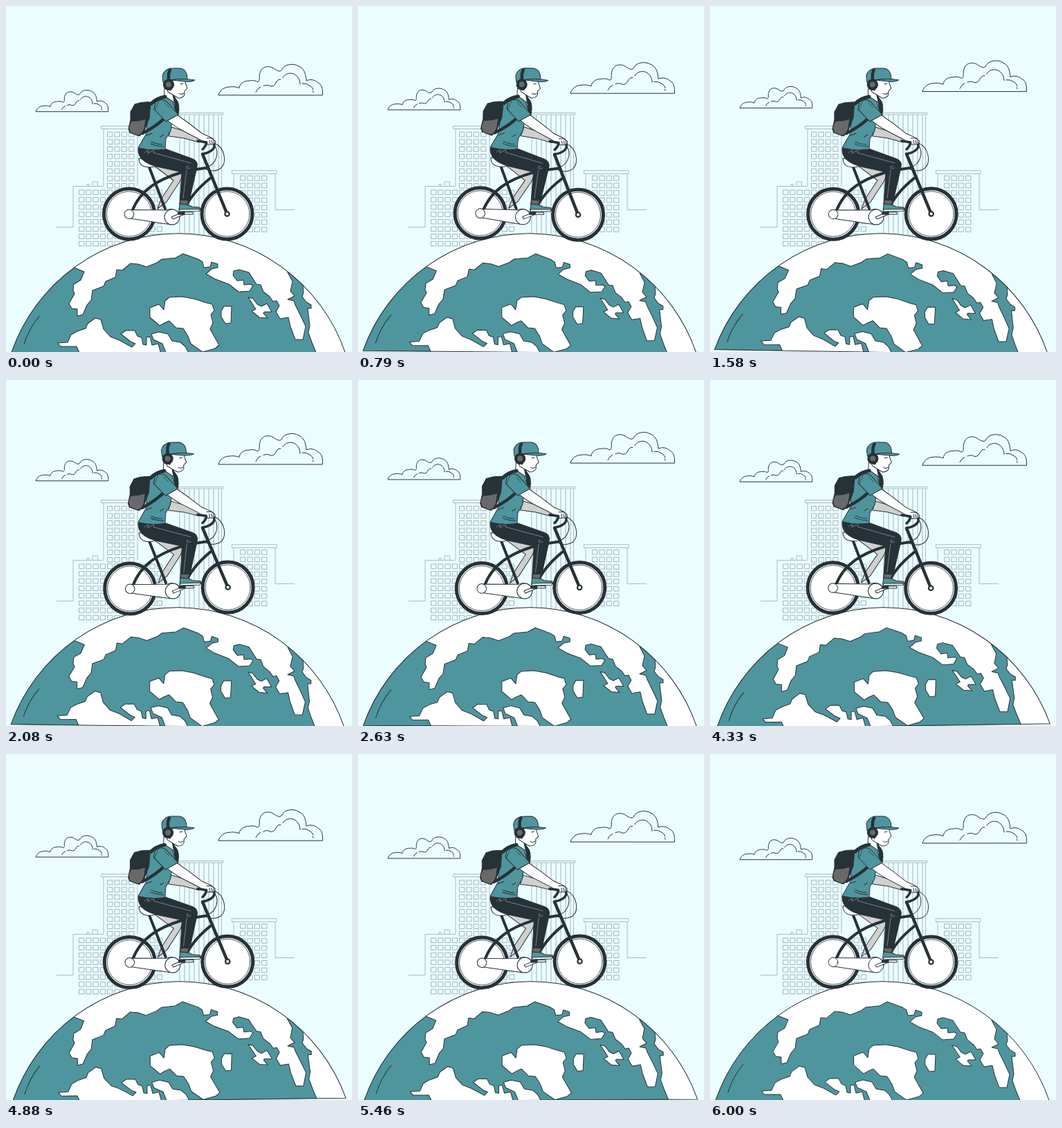
Animation, 500 px wide and 500 px high, one loop 6.04 s. Source, as an HTML page:

```html
<!DOCTYPE html>
<html lang="en">
<head>
<meta charset="utf-8">
<title>Cyclist on a globe</title>
<style>
  html, body { margin: 0; width: 100%; height: 100%; overflow: hidden; background: #ebfdff; }
  svg { display: block; width: 100%; height: 100%; }
  .ink { stroke: #263238; stroke-width: 1; stroke-linejoin: round; stroke-linecap: round; fill: none; }
  .far { stroke: #a3b5ba; stroke-width: .9; fill: none; }
  .teal { fill: #4f959e; }
  .white { fill: #fff; }
  .dark { fill: #263238; }
  .shade { fill: #d0d0d0; }
  .grey { fill: #69696b; }
  .tube { stroke-width: 4; }
</style>
</head>
<body>
<svg viewBox="0 0 500 500">
  <defs>
    <path id="dome" d="M8 500.4A255 255 0 0 1 490 500.4Z"/>
    <clipPath id="inside"><use href="#dome"/></clipPath>
    <g id="cloud">
      <path d="M307 128.5C309 122 315 117 323 117C328 116 333 117 337 118.500C338 111 345 108 352 108C357 107 361 108 364 110C368 107 365 101 367 97C369 87 380 85 388 91C392 94 396 95 398 93C401 84 415 82 423 87C432 91 433 99 434 108C440 105 447 107 451 111C456 113 458 119 457.5 128.5Z"/>
      <path d="M361 124.5Q363 119 368 117M372 115.5Q378 113 382 116Q388 117 391 109Q394 105 397 106M400 103.5C403 97 413 95 419 100Q425 105 425 113M428 112Q434 111 439 115Q443 117 444 121M443.5 123L444 125"/>
    </g>
    <g id="wheel">
      <circle r="36.500" class="white" stroke-width="5"/>
      <circle r="32.5" stroke-width=".8"/>
    </g>
  </defs>

  <g class="far">
    <path d="M73 319.5H97V260.5H141M117 260V257.5H120V260M125 260V254H132.5V260
      M141 260V177.5H137.5V173.5H194V177.5H141M190 177.5V260
      M249 157V154.5H314V157ZM251 157V332M311.5 157V262
      M329 270V242.5H326.5V237.8H391V242.5H329M389 242.5V294.5H417"/>
    <path id="panes" stroke-width="1"/>
  </g>

  <g id="sky" class="ink">
    <use href="#cloud"/>
    <use href="#cloud" transform="translate(-170.2 63) scale(.695)" stroke-width="1.4"/>
  </g>

  <g id="globe" class="ink">
    <g clip-path="url(#inside)">
      <use href="#dome" class="teal"/>
      <g class="white">
        <path d="M90 372L98 378L113 384L108 396L98 402L97 411L99 416L91 430L95 437L103 438L103 448L111 446L117 432L123 425L125 411L141 405L144 398L158 392L160 381L168 382L180 372L191 373L203 377L218 371L225 366L245 364L256 358L278 366L284 370L286 378L295 377L297 370L306 373L306 378L297 380L289 387L301 394L322 402L336 413L352 412L357 404L353 402L344 403L343 396L334 397L328 389L329 383L337 381L351 385L362 402L368 403L372 413L381 420L386 427L391 426L395 433L390 442L396 452L408 450L411 463L418 482L429 482L433 463L425 446L418 432L416 426L407 424L417 419L411 412L414 398L407 385L420 300H90Z"/>
        <path d="M429 402L430 414L428 420L434 428L441 432L441 437L436 437L439 462L437 472L442 486L449 503H510V402Z"/>
        <path d="M75 487L89 486L94 475L103 470L115 466L118 459L129 451L137 453L141 467L151 478L164 483L182 493L187 488L180 485L166 474L173 469L186 469L190 477L196 479L198 489L203 490L203 479L208 478L211 490L220 488L224 503H107L102 492L79 492Z"/>
        <path d="M210 474L221 471L234 474L240 484L252 486L259 492L265 503H232L226 488L213 482Z"/>
        <path d="M208 436L221 431L228 439L230 426L236 421L254 420L271 423L290 429L298 431L301 440L296 446L299 458L295 467L308 490L302 495L284 500L267 488L263 477L256 466L246 465L236 455L229 458L222 462L208 450Z"/>
        <path d="M311 441L315 434L326 434L325 458L317 459L311 449Z"/>
        <path d="M350 421L357 423L363 431L369 434L377 430L384 442L373 442L372 444L378 451L366 450L355 441L361 438Z"/>
      </g>
      <path d="M26 489Q33 466 48 448.5"/>
    </g>
    <use href="#dome"/>
  </g>

  <g id="rider" class="ink">
    <path class="shade" d="M214 231L249 236L256 243L251 254L232 283L219 293L224 279L242 252Z"/>
    <use href="#wheel" x="178" y="300.5"/>
    <use href="#wheel" x="319.5" y="300.5"/>

    <!-- frame, chain guard and steering -->
    <path class="tube" d="M207 233L230 293M182 297C194 265 222 250 252 241Q270 236 289 234M256 298C264 277 280 261 295 249"/>
    <path class="white" d="M178 294.500L232 295Q240 291 248 297L250 306Q246 317 236 315.5L179 307Z"/>
    <circle class="white" cx="178" cy="300.8" r="6.8"/>
    <circle class="white" cx="240" cy="305" r="11"/>
    <path class="white" d="M239 305L255 298L258 301L241 308Z"/>
    <path d="M284 214L319.5 300.5" stroke-width="4.5"/>
    <circle class="white" cx="319.5" cy="300.5" r="3.2" stroke-width="2.2"/>
    <path d="M301 198C317 205 319 226 311 234Q302 241 289 236M301 201C310 213 302 230 291 232"/>
    <path class="white" d="M192 220C192 231 201 235 215 232Q219 229 216 223Z"/>

    <!-- far arm, legs and shoe -->
    <path class="shade" d="M239 175L262 182L282 191L279 197L257 191L235 188Z"/>
    <path class="dark" d="M191 206L229 206L270 221Q278 225 276 233L265 281L263 287L251 286L254 240L218 232Q190 225 191 206Z"/>
    <path d="M200 212L206 208L205 213L214 208L213 212L267 227M264 232Q259 230 262 235L267 234M261 237L256 278" stroke="#98a2a6" stroke-width=".7"/>
    <path class="grey" d="M252 280L264 281L262 287L251 286Z"/>
    <path class="white" d="M249 298H270V301H249Z"/>
    <path class="dark" d="M249 298H258V301H249Z"/>
    <path class="teal" d="M251 286L262 287L269 290L280 291L281 295L250 296Z"/>
    <path class="white" d="M250 294L281 293.5L279 296.5L251 297Z"/>

    <!-- torso and pack -->
    <path class="white" d="M229 119L243 127L244 139L228 138Z"/>
    <path class="dark" d="M241 128L246 135Q252 141 249 157L244 157L244 143Z"/>
    <path class="teal" d="M209 139Q218 131 229 130L241 138L247 157L240 166L238 180L231 192L230 207Q210 210 191 205L203 184L205 150Z"/>
    <path d="M210 196Q217 200 226 200M209 199Q217 203 228 203M203 187L211 184M223 189L228 186"/>
    <path d="M210 141Q218 133 230 131" stroke-width="5"/>
    <path d="M197 184Q219 173 231 160" stroke-width="4.5"/>
    <path class="dark" d="M186 142Q197 138 209 139L207 162L200 180L193 188L179 183L177 178L180 164L180 153Z"/>
    <path class="grey" d="M181 166Q191 167 202 163L200 177Q196 187 190 187L180 183Q177 178 178 173Z"/>

    <!-- near arm, handlebar and hand -->
    <path class="white" d="M232 164L247 157L265 170L283 184L298 191L302 195L300 200L291 200L278 192L255 180Q242 173 232 164Z"/>
    <path class="teal" d="M216 139Q226 132 233 139L249 157L231 167L214 149Z"/>
    <path d="M215 151L221 137M229 140L236 147" stroke-width=".7"/>
    <path d="M277 195L290 197Q289 203 284 207M284 214Q298 211 301 204L301 196" stroke-width="3.5"/>
    <path class="white" d="M290 192L297 191L302 195L301 199L292 199Z" stroke="none"/>
    <path d="M290 191L297 191L302 195M294 194L295 199M297 194L298 199M300 195L300 199"/>

    <!-- head -->
    <path class="white" d="M230 105H260L259 111L262 119L258 123L258 128Q256 133 249 133L242 129L234 124Z"/>
    <path d="M250 126Q253 129 257 126M252 113L256 112"/>
    <path class="dark" d="M228 108L240 107L241 117L238 122L232 120Z"/>
    <path class="teal" d="M227 110L226 101Q228 92 238 90H252Q262 92 262 106Q240 105 227 110Z"/>
    <path class="teal" d="M238 107Q256 104 273 107Q269 110 258 109Z"/>
    <path d="M236 110Q233 97 238 91" stroke-width="4.5" stroke-linecap="butt"/>
    <circle class="dark" cx="235" cy="113.5" r="7.6"/>
    <circle class="grey" cx="235" cy="113.5" r="4.5"/>
  </g>
</svg>
<script>
  const el = id => document.getElementById(id);

  const grid = (x, y, cols, rows, dx) => {
    let d = '';
    for (let r = 0; r < rows; r++)
      for (let c = 0; c < cols; c++)
        d += `M${x + c * dx} ${y + r * 10.6}h7.3v6.6h-7.3z`;
    return d;
  };
  let panes = grid(105.5, 266, 12, 8, 10.25) + grid(146.5, 182.3, 4, 8, 10.4) + grid(338.5, 245.5, 4, 8, 10.4);
  for (let x = 258; x < 310; x += 7) panes += `M${x} 157V332`;
  el('panes').setAttribute('d', panes);

  const LOOP = 6040, CYCLE = 6000;
  // Linear swing: 0, +1 at a quarter, -1 at three quarters, 0.
  const swing = p => Math.asin(Math.sin(p * 2 * Math.PI)) * 2 / Math.PI;
  const move = (id, value) => el(id).setAttribute('transform', value);
  const start = performance.now();

  function draw() {
    const p = Math.min((performance.now() - start) % LOOP, CYCLE) / CYCLE;
    move('sky', `translate(0 ${-10 * (1 - Math.abs(1 - 2 * p))})`);
    move('globe', `rotate(${swing(p)} 249 414.7)`);
    move('rider', `rotate(${swing(2 * p)} 248.5 214.5)`);
    requestAnimationFrame(draw);
  }
  draw();
</script>
</body>
</html>
```
